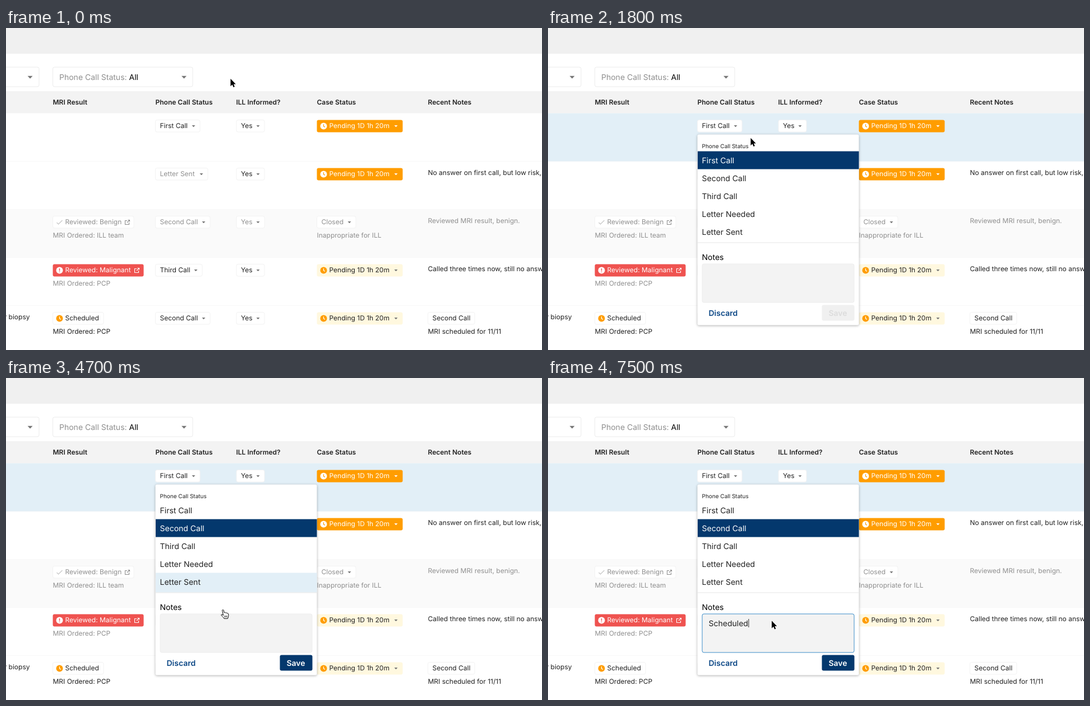
Write an HTML page that moves like this. It is 956 px wide and 576 px high and loops after 8000 ms.

```html
<!DOCTYPE html>
<html lang="en">
<head>
<meta charset="utf-8">
<title>Case table</title>
<style>
html, body { margin: 0; width: 100%; height: 100%; overflow: hidden; background: #fff; }
svg { display: block; width: 956px; height: 576px; font-family: Inter, Arial, sans-serif; }
text { white-space: pre; text-rendering: geometricPrecision; }
#menu { filter: drop-shadow(0 1px 2px rgba(0, 0, 0, .32)); }
</style>
</head>
<body>
<svg id="stage" viewBox="0 0 956 576"></svg>
<script>
const LOOP = 8000, STEP = 100;
const INK = '#222', GRAY = '#8f8f8f', NAVY = '#04386d', PALE = '#e2eff7', SKY = '#8fbedc',
      ORANGE = '#ff9d00', CREAM = '#fff8df', RED = '#ef5350', CARET = '#757575';
const stage = document.getElementById('stage');

// Text is placed by the middle of its line.
const text = (x, mid, str, { size = 12, fill = INK, weight = 400, anchor = 'start' } = {}) =>
  `<text x="${x}" y="${mid + size * .364}" font-size="${size}" font-weight="${weight}" fill="${fill}" text-anchor="${anchor}">${str}</text>`;
const rect = (x, y, w, h, fill, extra = '') =>
  `<rect x="${x}" y="${y}" width="${w}" height="${h}" fill="${fill}" ${extra}/>`;
const framed = (x, y, w, h, fill, stroke) => rect(x, y, w, h, fill, `rx="3" stroke="${stroke}"`);
const at = (x, y, body) => `<g transform="translate(${x} ${y})">${body}</g>`;
const line = (d, stroke, width = 1.1) =>
  `<path d="${d}" fill="none" stroke="${stroke}" stroke-width="${width}"/>`;
const caret = (x, y, fill = CARET, s = 1) =>
  `<path d="M${x - 3 * s} ${y - 1.6 * s}h${6 * s}l${-3 * s} ${3.2 * s}z" fill="${fill}"/>`;

const clock = (x, y, face, hands) =>
  at(x, y, `<circle r="6" fill="${face}"/>` + line('M0-3.6V.3L2.6 1.8', hands, 1.2));
const link = (x, y, color) => at(x, y, line('M-.5-3H-4V4H3V.5M1-4H4V-1M4-4L-.5 .5', color));
const check = (x, y) => at(x, y, line('M-5 .5L-2 3.5 5-3.5', '#c4c4c4'));
const alert = (x, y) =>
  at(x, y, '<circle r="6" fill="#fff"/>' + line('M0-3.5V1M0 2.2V3.6', RED, 1.4));

const tag = (x, mid, w, label, fill = INK, arrow = true) =>
  framed(x, mid - 10.5, w, 21.5, '#fff', '#f2f2f2') + text(x + 8, mid, label, { fill }) +
  (arrow ? caret(x + w - 11.5, mid + .7) : '');
const yes = (mid, fill) => tag(411, mid, 50, 'Yes', fill);
function pending(mid, strong) {
  const fill = strong ? '#fff' : INK;
  return rect(554.5, mid - 10.5, 153, 22, strong ? ORANGE : CREAM, 'rx="3"') +
    clock(566.5, mid + .5, strong ? '#fff' : ORANGE, strong ? ORANGE : '#fff') +
    text(576.5, mid, 'Pending 1D 1h 20m', { fill }) + caret(695.5, mid + .7, strong ? '#fff' : CARET);
}

function table(s) {
  const gray = { fill: GRAY }, white = { fill: '#fff' };
  const heads = [[83.5, 'MRI Result'], [266.5, 'Phone Call Status'], [410.5, 'ILL Informed?'],
                 [554.5, 'Case Status'], [752.5, 'Recent Notes']];
  return rect(0, 0, 956, 576, '#fff') + rect(0, 0, 956, 46, '#f0f0f0') +
    framed(-20, 70, 79, 35, '#fff', '#ebebeb') + caret(43, 88.2, CARET, 1.5) +
    framed(83.5, 70, 249.5, 35, '#fff', '#ebebeb') + caret(317.5, 88.2, CARET, 1.5) +
    text(95, 88, `Phone Call Status: <tspan fill="#000">All</tspan>`, { size: 14, fill: GRAY }) +
    rect(0, 113, 956, 39.5, '#f3f3f3') +
    heads.map(([x, str]) => text(x, 133, str, { weight: 600 })).join('') +
    rect(0, 324, 956, 86, '#fafafa') +
    [238, 324, 410, 496].map(y => rect(0, y, 956, 1, '#f8f8f8')).join('') +
    (s.open ? rect(0, 152.5, 956, 86, PALE) : '') +
    (s.cell ? rect(258.5, 152.5, 144, 86, s.cell) : '') +

    tag(266.5, 175, 79.5, 'First Call') + yes(175) + pending(175, true) +

    tag(266.5, 261, 93.5, 'Letter Sent', GRAY) + yes(261) + pending(261, true) +
    text(752.5, 259, 'No answer on first call, but low risk,') +

    framed(83.5, 336.5, 144.5, 21.5, '#fff', '#f2f2f2') + check(95.5, 347.5) +
    text(105.5, 347, 'Reviewed: Benign', gray) + link(216.5, 347.5, GRAY) +
    text(83.5, 371, 'MRI Ordered: ILL team', gray) +
    tag(266.5, 347, 97.5, 'Second Call', GRAY) + yes(347, GRAY) +
    tag(554.5, 347, 69.5, 'Closed', GRAY) + text(554.5, 371, 'Inappropriate for ILL', gray) +
    text(752.5, 345, 'Reviewed MRI result, benign.', gray) +

    rect(83.5, 422.5, 162, 22, RED, 'rx="3"') + alert(95.5, 433.5) +
    text(105.5, 433, 'Reviewed: Malignant', white) + link(233.5, 433.5, '#fff') +
    text(83.5, 457, 'MRI Ordered: PCP', gray) +
    tag(266.5, 433, 83.5, 'Third Call') + yes(433) + pending(433, false) +
    text(752.5, 431, 'Called three times now, still no answer') +

    text(42.5, 517, 'for biopsy', { anchor: 'end' }) +
    framed(83.5, 508.5, 90.5, 21.5, '#fff', '#f2f2f2') + clock(95.5, 519.5, ORANGE, '#fff') +
    text(105.5, 519, 'Scheduled') + text(83.5, 543, 'MRI Ordered: PCP') +
    tag(266.5, 519, 97.5, 'Second Call') + yes(519) + pending(519, false) +
    tag(752.5, 519, 83.5, 'Second Call', INK, false) + text(752.5, 543, 'MRI scheduled for 11/11');
}

const OPTIONS = ['First Call', 'Second Call', 'Third Call', 'Letter Needed', 'Letter Sent'];

function menu(s) {
  const options = OPTIONS.map((name, i) => {
    const y = 220.5 + 32 * i, on = i === s.selected;
    const back = on ? NAVY : i === s.hover ? s.hoverFill : '';
    return (back ? rect(267, y, 287.5, i === 4 ? 35 : 32, back) : '') +
      text(274.5, y + 16, name, { size: 14, fill: on ? '#fff' : INK });
  }).join('');
  const note = s.focus
    ? framed(275, 422, 271, 69, '#f3f3f3', '#3a8cc8')
    : framed(275, 422, 271, 69, s.note || '#f3f3f3', '#ededed');
  const saved = s.selected === 1;
  return `<g id="menu">${rect(266.5, 190.5, 288, 341, '#fff', 'rx="3"')}</g>` +
    text(274.5, 211, 'Phone Call Status', { size: 10 }) + options +
    rect(267, 383.5, 287.5, 1, '#e6e6e6') +
    text(274.5, 409.5, 'Notes', { size: 14, fill: '#000' }) + note +
    (s.focus ? text(286.5, 438.5, `${s.typed}<tspan id="end"> </tspan>`, { size: 14 }) +
      rect(0, 431, 1, 15, INK, 'id="bar"') : '') +
    text(286.5, 510, 'Discard', { size: 14, weight: 600, fill: '#0d4886' }) +
    rect(488.5, 495.5, 58, 28, saved ? NAVY : '#f0f0f0', 'rx="3"') +
    text(517, 510, 'Save', { size: 14, weight: 600, anchor: 'middle', fill: saved ? '#fff' : '#dcdcdc' });
}

const ARROW = `<path d="M.5 .8V14.2L3.5 11.3 5.7 16 7.9 15 5.9 10.4H9.8Z" fill="#000"
  stroke="#fff" stroke-width="1.4" paint-order="stroke" stroke-linejoin="round"/>`;
const HAND = `<path d="M-1 3c-.4-1.6 2-2 2.5-.3l.9 4c1-.8 2.2-.3 2.5.5 1-.6 2.2-.2 2.5.7 1.6-.5 2.5.4 2.6 2
  l.1 2.6c0 2-1.2 3-1.4 4.8H2.2c-.8-2.4-3.2-3.6-4.8-5.6-.9-1.2.5-2.3 1.8-1.4l1.6 1.2Z"
  fill="#fff" stroke="#000" stroke-linejoin="round"/>` + line('M3.2 12V15.3M5.2 12V15.3M7.2 12V15.3', '#000', .8);

// Each move: first step, then start and end of the pointer's hot spot.
const MOVES = [
  [1, [400, 90], [361, 196]],
  [22, [361, 196], [351.5, 269.5]],
  [45, [351.5, 269.5], [398.5, 433.5]]
];
// The vertical part of a move settles sooner than the horizontal one.
function pointer(n) {
  let [, pos] = MOVES[0];
  for (const [first, a, b] of MOVES) {
    if (n < first) break;
    const left = 1 - Math.min(1, (n - first + 1) / 6);
    pos = b.map((v, i) => v + (a[i] - v) * left ** (i + 2));
  }
  return pos;
}

const TYPED = [[75, 9], [72, 6], [69, 4], [66, 2]];

function stateAt(n) {
  const y = pointer(n - 1)[1];   // hover trails the pointer by one step
  const s = { open: n >= 17, selected: n >= 39 ? 1 : 0, focus: n >= 57, hover: -1, hoverFill: PALE };
  if (!s.open && y > 152.5) s.cell = n >= 14 ? SKY : PALE;
  if (s.open && y > 220 && y < 390) s.hover = Math.min(4, Math.floor((y - 220.5) / 32));
  if (n >= 34 && n < 39) s.hoverFill = SKY;
  if (y > 400) s.note = n >= 55 ? SKY : PALE;
  s.hand = s.cell && n < 15 || n >= 23 && n < 37 || n >= 45 && n < 57;
  const typed = TYPED.find(([from]) => n >= from);
  s.typed = 'Scheduled'.slice(0, typed ? typed[1] : 0);
  return s;
}

function draw(n) {
  const s = stateAt(n);
  stage.innerHTML = table(s) + (s.open ? menu(s) : '') + at(...pointer(n), s.hand ? HAND : ARROW);
  const bar = document.getElementById('bar');
  if (bar) bar.setAttribute('x', document.getElementById('end').getStartPositionOfChar(0).x + .5);
}

let shown = -1;
function tick() {
  const n = Math.floor(performance.now() % LOOP / STEP);
  if (n !== shown) draw(shown = n);
  requestAnimationFrame(tick);
}
tick();
</script>
</body>
</html>
```
